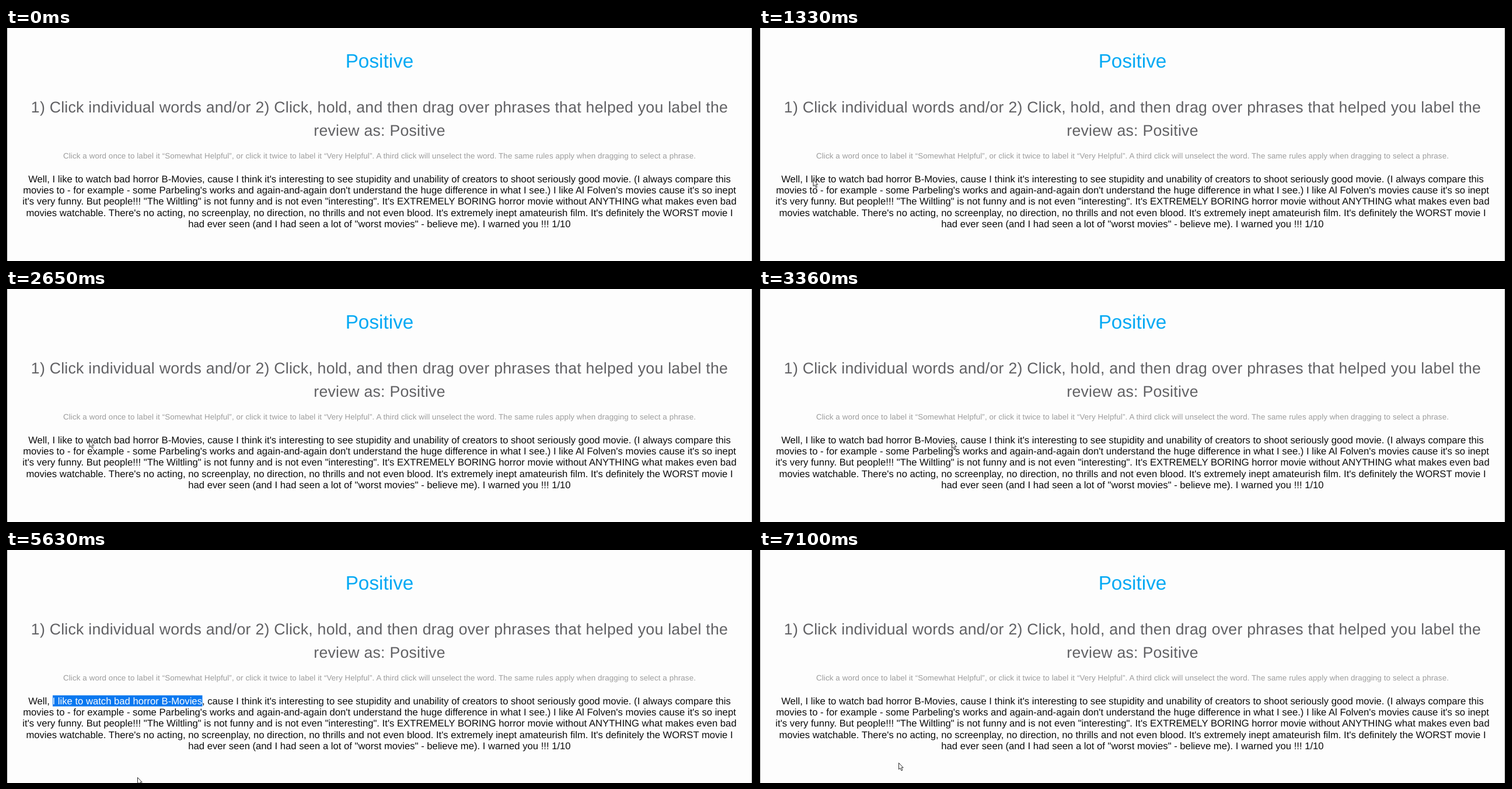
An HTML page for the animation above (7200 ms loop, 1280 by 400 pixels).

```html
<!DOCTYPE html>
<html lang="en">
<head>
<meta charset="utf-8">
<title>Phrase labelling</title>
<style>
  html, body { margin: 0; width: 100%; height: 100%; overflow: hidden; background: #fdfdfd; }
  svg { display: block; width: 1280px; height: 400px; }
  text {
    font-family: "Liberation Sans", Arial, sans-serif;
    text-anchor: middle;
    text-rendering: geometricPrecision;
    white-space: pre;
  }
  .task, .hint { letter-spacing: .00938em; }
  .title { font-size: 33.33px; fill: #03a9f4; }
  .task { font-size: 26.67px; fill: #616164; }
  .hint { font-size: 13.33px; fill: #9c9c9c; }
  .review { font-size: 16.67px; fill: #0c0c0c; }

  .mark { animation: mark 7.2s step-end infinite; }
  .phrase { animation: phrase 7.2s step-end infinite; }
  .cursor { animation: move 7.2s ease-in-out infinite, show 7.2s step-end infinite; }

  /* none, somewhat helpful, very helpful, none */
  @keyframes mark {
    0% { fill: transparent; }
    53.9% { fill: #03b2f2; }
    74.4% { fill: #0a78f0; }
    92.5%, 100% { fill: transparent; }
  }
  @keyframes phrase {
    0% { fill: #0c0c0c; }
    53.9% { fill: #fdfdfd; }
    92.5%, 100% { fill: #0c0c0c; }
  }
  @keyframes show {
    0% { opacity: 0; }
    6.5%, 100% { opacity: 1; }
  }
  @keyframes move {
    0%, 6.5% { transform: translate(148px, 400px); }
    12.2% { transform: translate(105px, 261px); }
    14% { transform: translate(104px, 261px); }
    23%, 32% { transform: translate(81px, 259px); }
    46%, 54% { transform: translate(330px, 262px); }
    62.5%, 66% { transform: translate(183px, 369px); }
    72%, 74.4% { transform: translate(193px, 261px); }
    78.1%, 83% { transform: translate(225px, 390px); }
    90%, 92.8% { transform: translate(222px, 261px); }
    97.2%, 100% { transform: translate(239px, 365px); }
  }
</style>
</head>
<body>
<svg viewBox="0 0 1280 400">
  <rect width="1280" height="400" fill="#fdfdfd"/>
  <path d="M0 0H2V400H0ZM1278 0H1280V400H1278Z" fill="#000"/>

  <text class="title" x="640" y="67.8">Positive</text>
  <text class="task" x="640" y="145">1) Click individual words and/or 2) Click, hold, and then drag over phrases that helped you label the</text>
  <text class="task" x="640" y="185">review as: Positive</text>
  <text class="hint" x="640" y="223.7">Click a word once to label it “Somewhat Helpful”, or click it twice to label it “Very Helpful”. A third click will unselect the word. The same rules apply when dragging to select a phrase.</text>

  <rect class="mark" x="80" y="249.5" width="256.5" height="19"/>
  <g class="review">
    <text x="640" y="264.8">Well, <tspan class="phrase">I like to watch bad horror B-Movies</tspan>, cause I think it's interesting to see stupidity and unability of creators to shoot seriously good movie. (I always compare this</text>
    <text x="640" y="284.1">movies to - for example - some Parbeling's works and again-and-again don't understand the huge difference in what I see.) I like Al Folven's movies cause it's so inept</text>
    <text x="640" y="303.4">it's very funny. But people!!! "The Wiltling" is not funny and is not even "interesting". It's EXTREMELY BORING horror movie without ANYTHING what makes even bad</text>
    <text x="640" y="322.7">movies watchable. There's no acting, no screenplay, no direction, no thrills and not even blood. It's extremely inept amateurish film. It's definitely the WORST movie I</text>
    <text x="640" y="342">had ever seen (and I had seen a lot of "worst movies" - believe me). I warned you !!! 1/10</text>
  </g>

  <path class="cursor" d="M.5 .5V11.6L3 9.4L5 13.8L6.9 13L5 8.7H8.2Z" fill="#fdfdfd" stroke="#2c2c2c"/>
</svg>
</body>
</html>
```
